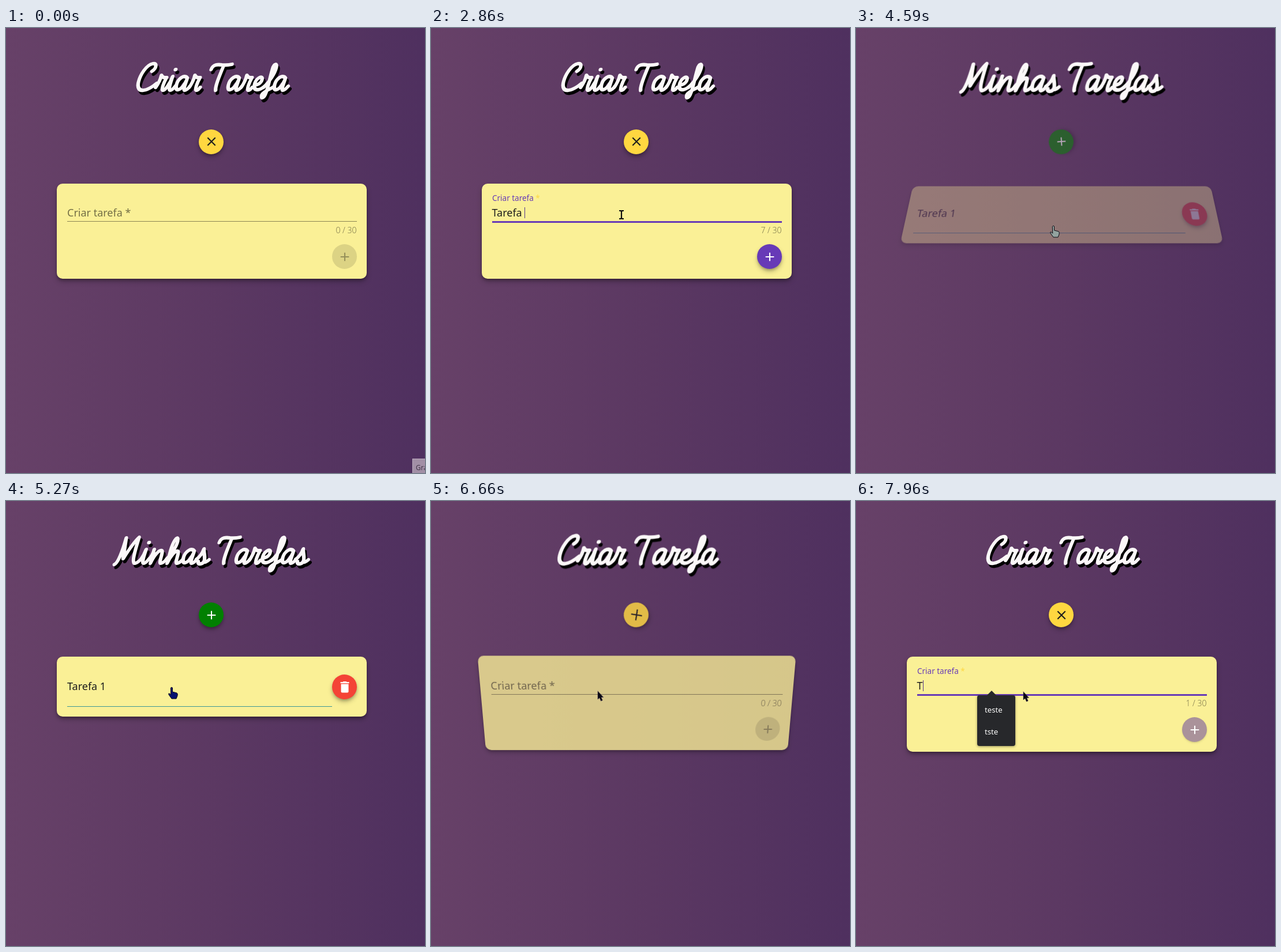
An HTML page for the animation above (8 s loop, 726 px wide and 772 px high).

```html
<!DOCTYPE html>
<html lang="pt">
<head>
<meta charset="utf-8">
<title>Tarefas</title>
<style>
  html, body { margin: 0; width: 100%; height: 100%; overflow: hidden; }
  body { background: #5b3862; }
  #stage {
    position: relative; width: 726px; height: 772px; overflow: hidden;
    background: linear-gradient(to right, #674168, #5b3862 52%, #4f305f);
    font: 18px/20px "Noto Sans", "Open Sans", sans-serif; color: #1c1c1c;
  }
  #stage *, #stage svg { position: absolute; }
  svg { overflow: visible; fill: none; stroke-linecap: round; stroke-linejoin: round; }

  .title {
    left: 0; top: 0; width: 726px; height: 186px;
    stroke: #fbf8f8; stroke-width: 6.2;
    filter: drop-shadow(3.5px 5px 0 #000);
    transform-origin: 356px 92px;
    animation: pulse 1s ease-in-out var(--in) both;
  }
  .fab {
    width: 43px; height: 43px; border-radius: 50%;
    box-shadow: 0 3px 5px -1px rgba(0,0,0,.25), 0 5px 9px rgba(0,0,0,.2);
  }
  .fab svg { left: 21.5px; top: 21.5px; width: 1px; height: 1px; stroke: currentColor; stroke-width: 2.1; stroke-linecap: butt; }
  .top {
    left: 334px; top: 175.5px;
    animation: spin 1s ease var(--in) both;
  }
  .close { background: #ffd740; color: #1c1c1c; }
  .open { background: #008000; color: #fff; }
  .card {
    left: 87.5px; top: 269.5px; width: 537px; height: 165px;
    border-radius: 10px; background: #faf096;
    box-shadow: 0 3px 5px -1px rgba(0,0,0,.3), 0 5px 10px rgba(0,0,0,.25);
    animation: flip 1s var(--in) both;
  }
  .list .card { height: 104px; }

  .label {
    left: 17.5px; top: 39.5px; white-space: pre; color: rgba(0,0,0,.54);
    transform-origin: 0 50%;
    animation: float .4s cubic-bezier(.25,.8,.25,1) var(--focus) both;
  }
  .label b {
    position: static !important; font-weight: 500;
    animation: star .4s var(--focus) both;
  }
  .field { left: 17.5px; top: 39.5px; white-space: pre; }
  .field * { position: static !important; }
  .caret {
    display: inline-block; width: 1px; height: 19px; margin-right: -1px;
    vertical-align: -3px; background: #54358c;
  }
  .line { left: 17.5px; top: 65px; width: 502px; height: 1px; background: rgba(0,0,0,.45); }
  .ripple {
    left: 17.5px; top: 65px; width: 502px; height: 2.6px; background: #673ab7;
    animation: spread .3s cubic-bezier(.25,.8,.25,1) var(--focus) both;
  }
  .count {
    right: 17.5px; top: 70.5px; white-space: pre; color: rgba(0,0,0,.54);
    font-family: "Open Sans", "Noto Sans", sans-serif; font-size: 14px; font-weight: 300;
  }
  .add {
    left: 477px; top: 105px;
    animation: arm .4s cubic-bezier(.25,.8,.25,1) var(--arm) both;
  }
  .task { left: 18px; top: 40.5px; white-space: pre; }
  .rule { left: 17.5px; top: 85.5px; width: 459px; height: 1px; background: #3c9696; }
  .bin { left: 477px; top: 31px; background: #f44336; color: #fff; }
  .bin path { fill: #fff; stroke: none; }

  #menu {
    left: 210px; top: 337px; width: 66px; box-sizing: border-box; padding: 5.5px 0;
    border-radius: 4px; background: #27282b; color: #fff;
    font-size: 13.2px; box-shadow: 0 1px 4px rgba(0,0,0,.4);
  }
  #menu::before {
    content: ""; position: absolute; left: 17px; top: -8px;
    border: solid transparent; border-width: 0 8px 8.5px; border-bottom-color: #27282b;
  }
  #menu div { position: static; padding-left: 13px; line-height: 38.3px; }
  #tip {
    left: 704px; top: 747px; width: 60px; height: 40px; padding: 5px; box-sizing: border-box;
    background: #a28fa6; border: 1px solid #b9a9bc; color: #43364a; font-size: 12px;
  }
  #pointer { left: 0; top: 0; width: 1px; height: 1px; stroke-width: 1; }

  @keyframes pulse { 50% { transform: scale(1.05); } }
  @keyframes spin { from { transform: rotate(-200deg); opacity: 0; } }
  @keyframes flip {
    from { transform: perspective(400px) rotateX(90deg); opacity: 0; animation-timing-function: ease-in; }
    40% { transform: perspective(400px) rotateX(-20deg); animation-timing-function: ease-in; }
    60% { transform: perspective(400px) rotateX(10deg); opacity: 1; }
    80% { transform: perspective(400px) rotateX(-5deg); }
    to { transform: perspective(400px) rotateX(0); }
  }
  @keyframes float { to { transform: translateY(-25px) scale(.75); color: #673ab7; } }
  @keyframes star { to { color: #ffd740; } }
  @keyframes spread { from { transform: scaleX(.5); opacity: 0; } }
  @keyframes arm {
    from { background: #dcd384; color: rgba(0,0,0,.32); box-shadow: 0 0 0 transparent; }
    1%, to { color: #fff; }
    to { background: #673ab7; }
  }
</style>
</head>
<body>
<div id="stage"></div>
<script>
const LOOP = 8000;
const stage = document.getElementById('stage');

// Script lettering: [advance, pen path], upright, baseline at 0.
const pen = {
  C: [35, 'M22-34C29-39 28-49 20-47C10-45 3-28 3-15C3-4 9 0 15-1C23-2 30-8 35-13'],
  r: [20, 'M0-6C4-14 5-20 5-27C8-22 12-23 15-23C12-14 10-2 14-1C17-1 18-4 19-6'],
  i: [14, 'M0-8C2-12 4-18 5-25C4-14 2-1 7-1C10-1 12-6 14-9M7-37h.6'],
  a: [24, 'M17-22C11-29 1-22 1-10C1 3 12 1 17-20C16-10 14-1 18-1C21-1 23-5 25-8'],
  T: [31, 'M-4-37C-3-46 5-46 12-45Q21-44 30-46M16-44C14-30 9-10 12-1'],
  e: [19, 'M3-10C10-11 14-15 13-21C11-27 2-22 2-11C2 0 12 1 20-8'],
  f: [17, 'M0-6C8-16 14-30 14-40C14-48 8-48 8-38C7-20 8-5 6 5C5 14-1 14 0 6C2 0 12-2 18-8'],
  M: [45, 'M1 1C7-2 10-24 11-45C12-32 13-18 14-9C20-24 26-38 33-46C32-30 29-2 36-1C40-1 43-6 46-9'],
  n: [30, 'M0-8C3-13 5-19 5-25L4-1C7-14 13-24 18-23C23-22 17-2 22-1C26-1 29-6 31-9'],
  h: [28, 'M0-8C8-18 14-34 12-42C9-50 5-38 4-25L3-1C6-14 12-23 16-22C21-21 15-2 20-1C24-1 26-5 29-8'],
  s: [22, 'M0-8C5-12 8-19 9-26C10-18 16-10 14-4C12 2 4 1 4-4M14-3C18-2 20-5 22-7'],
  ' ': [15, '']
};

function title(text, x) {
  const glyphs = [...text].map(ch => {
    const [advance, d] = pen[ch];
    const glyph = `<path d="${d}" transform="translate(${x} 109) skewX(-13)"/>`;
    x += advance;
    return glyph;
  }).join('');
  return `<svg class="title" role="img" aria-label="${text}">${glyphs}</svg>`;
}

const fab = (cls, icon) => `<div class="fab ${cls}"><svg>${icon}</svg></div>`;
const plus = '<path d="M-7.3 0H7.3M0-7.3V7.3"/>';
const cross = '<path d="M-6.7-6.7L6.7 6.7M-6.7 6.7L6.7-6.7"/>';
const trash = '<path d="M-7.5-9H-3.5L-2.5-10H2.5L3.5-9H7.5V-6.8H-7.5ZM-6.5-5.5H6.5V7.5Q6.5 9.5 4.5 9.5H-4.5Q-6.5 9.5-6.5 7.5Z"/>';

function page(cls, times, html) {
  const el = document.createElement('section');
  el.className = cls;
  for (const key in times) el.style.setProperty('--' + key, times[key] + 'ms');
  el.innerHTML = html;
  stage.append(el);
  return el;
}

const form = times => page('form', times, title('Criar Tarefa', 223) + fab('top close', cross) +
  `<div class="card">
    <div class="label">Criar tarefa <b>*</b></div>
    <div class="field"><span></span><i class="caret"></i></div>
    <div class="line"></div><div class="ripple"></div>
    <div class="count"></div>${fab('add', plus)}
  </div>`);

// Each page is shown from its start until the next one begins.
const LIST = 4282, AGAIN = 6143;
const pages = [
  { from: 0, to: LIST, focus: 850, keys: [1920, 2060, 2200, 2330, 2530, 2660, 2790, 2920],
    el: form({ in: -1100, focus: 850, arm: 1920 }) },
  { from: LIST, to: AGAIN,
    el: page('list', { in: LIST }, title('Minhas Tarefas', 187) + fab('top open', plus) +
      `<div class="card"><div class="task">Tarefa 1</div><div class="rule"></div>${fab('bin', trash)}</div>`) },
  { from: AGAIN, to: LOOP, focus: 7060, keys: [7950],
    el: form({ in: AGAIN, focus: 7060, arm: 7908 }) }
];

stage.insertAdjacentHTML('beforeend',
  '<div id="menu"></div><div id="tip">Gravar</div><svg id="pointer"></svg>');
const [menu, tip, pointer] = ['menu', 'tip', 'pointer'].map(id => document.getElementById(id));

const menus = [
  [1920, ['teste', 'tste', 'tarefa', 'texto', 'tempo']],
  [2060, ['tarefa', 'tarefas']],
  [2790, []],
  [7950, ['teste', 'tste']]
];

const hand = fill => `<path fill="${fill}" stroke="#0b0b14" d="M-1.5 1Q0-1 1.5 1V8L9 10Q11 11 10 15L8 20H0L-5 13Q-6 10-3.5 11L-1.5 13Z"/>`;
const shapes = {
  arrow: '<path fill="#0a0812" stroke="#3a2c55" stroke-width=".5" d="M0 0V14L3 11.4L5.4 17L8.2 15.8L5.8 10.4H9.5Z"/>',
  beam: '<path stroke="#0c0c0c" stroke-width="2.2" stroke-linecap="butt" d="M-4-7H-1.5L0-6L1.5-7H4M0-6V6M-4 7H-1.5L0 6L1.5 7H4"/>',
  green: hand('#8fae3a'), pale: hand('#93a39f'), navy: hand('#061270')
};

// Pointer stops: time, x, y, shape from then on.
const stops = [
  [0, 740, 790, 'arrow'], [70, 722, 768, 'arrow'], [290, 365, 435, 'arrow'], [370, 346, 376, 'arrow'],
  [450, 334, 339, 'beam'], [700, 334, 339, 'beam'], [850, 330, 324, 'beam'], [3720, 330, 324, 'beam'],
  [3930, 596, 397, 'green'], [4270, 590, 396, 'pale'], [4590, 342, 343, 'pale'], [4850, 287, 323, 'navy'],
  [5420, 287, 323, 'navy'], [5850, 355, 195, 'navy'], [6135, 355, 195, 'arrow'], [6600, 288, 329, 'arrow'],
  [6720, 290, 331, 'beam'], [7950, 290, 331, 'arrow'], [LOOP, 290, 331, 'arrow']
];

const last = (list, t) => list.filter(item => item[0] <= t).pop();

function drawForm({ el, focus, keys }, t) {
  const typed = keys.filter(k => k <= t);
  const idle = t - (typed.length ? typed[typed.length - 1] : focus);
  el.querySelector('.field span').textContent = 'Tarefa 1'.slice(0, typed.length);
  el.querySelector('.count').textContent = typed.length + ' / 30';
  el.querySelector('.caret').style.opacity = idle >= 0 && idle % 1000 < 500 ? 1 : 0;
}

function drawPointer(t) {
  const i = stops.findIndex(s => s[0] > t);
  const [t0, x0, y0, shape] = stops[i - 1], [t1, x1, y1] = stops[i];
  const p = (t - t0) / (t1 - t0), q = p * p * (3 - 2 * p);
  pointer.innerHTML = shapes[shape];
  pointer.style.transform = `translate(${x0 + (x1 - x0) * q}px, ${y0 + (y1 - y0) * q}px)`;
}

const clips = document.getAnimations();
clips.forEach(clip => clip.pause());

function draw() {
  const t = performance.now() % LOOP;
  clips.forEach(clip => { clip.currentTime = t; });
  for (const p of pages) {
    p.el.style.visibility = t >= p.from && t < p.to ? 'visible' : 'hidden';
    if (p.keys) drawForm(p, t);
  }
  const items = (last(menus, t) || [0, []])[1];
  menu.style.visibility = items.length ? 'visible' : 'hidden';
  menu.innerHTML = items.map(text => `<div>${text}</div>`).join('');
  tip.style.visibility = t < 70 ? 'visible' : 'hidden';
  drawPointer(t);
  requestAnimationFrame(draw);
}
draw();
</script>
</body>
</html>
```
